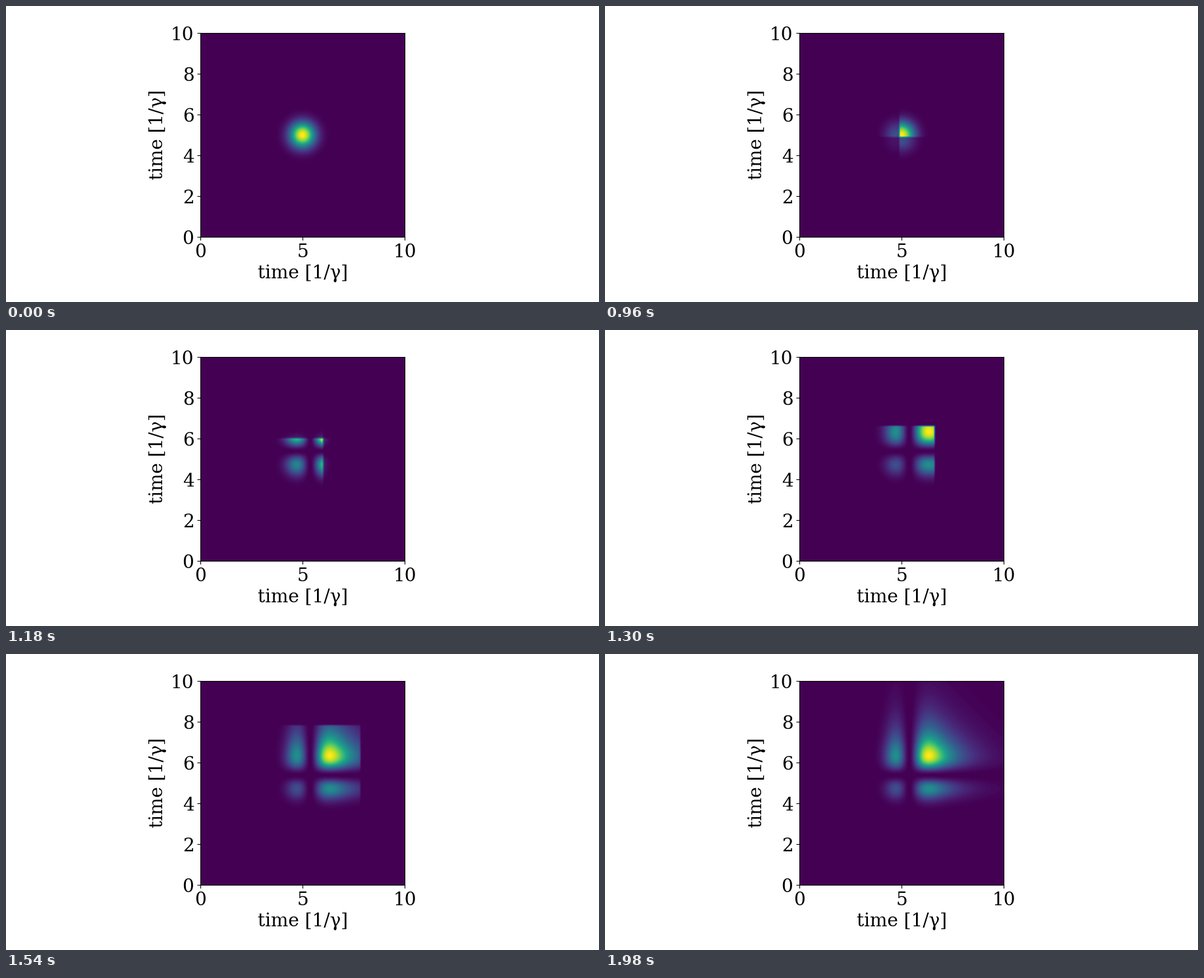
A matplotlib script for the animation above (2020 ms loop, 900x450 px).

```python
import math

import matplotlib.pyplot as plt
import numpy as np
from matplotlib.animation import FuncAnimation

W, H, DPI = 900, 450, 100
LEFT, BOTTOM, SIDE = 295, 99, 310
T_MAX, STEPS, FRAMES = 10, 100, 101
CENTER = 5
SIGMA = 0.5 / math.sqrt(math.log(2))  # intensity FWHM of one lifetime
DECAY = 0.5  # amplitude decay rate, in units of gamma

t = np.linspace(0, T_MAX, STEPS)
pixels = (np.arange(SIDE) + 0.5) * T_MAX / SIDE


def pulse(u):
    return np.exp(-u**2 / (2 * SIGMA**2))


def response(u):
    """Pulse convolved with the emitter's exponential decay."""
    cdf = [0.5 * (1 + math.erf((x / SIGMA - DECAY * SIGMA) / math.sqrt(2))) for x in u]
    area = SIGMA * math.sqrt(2 * math.pi)
    return area * np.exp(-DECAY * u + (DECAY * SIGMA) ** 2 / 2) * np.array(cdf)


incoming = pulse(t - CENTER)
outgoing = incoming - response(t - CENTER)


def joint_intensity(k):
    """Two-photon intensity once the emitter has acted on times up to step k."""
    amplitude = np.where(np.arange(STEPS) <= k, outgoing, incoming)
    intensity = amplitude**2 / np.max(amplitude**2)
    line = np.interp(pixels, t, intensity)
    return np.outer(line, line)


plt.rcParams.update({"font.family": "DejaVu Serif", "font.size": 20})
fig = plt.figure(figsize=(W / DPI, H / DPI), dpi=DPI, facecolor="white")
ax = fig.add_axes([LEFT / W, BOTTOM / H, SIDE / W, SIDE / H])

image = ax.imshow(
    joint_intensity(0),
    origin="lower",
    extent=(0, T_MAX, 0, T_MAX),
    cmap=plt.get_cmap("viridis", 100),
    vmin=0,
    vmax=1,
    interpolation="nearest",
    aspect="auto",
)
ax.set(xlabel="time [1/γ]", ylabel="time [1/γ]")
ax.set_xticks([0, 5, 10])
ax.set_yticks([0, 2, 4, 6, 8, 10])


def update(k):
    image.set_data(joint_intensity(k))
    return (image,)


anim = FuncAnimation(fig, update, frames=FRAMES, interval=20, repeat=True, repeat_delay=0)
plt.show()
```
